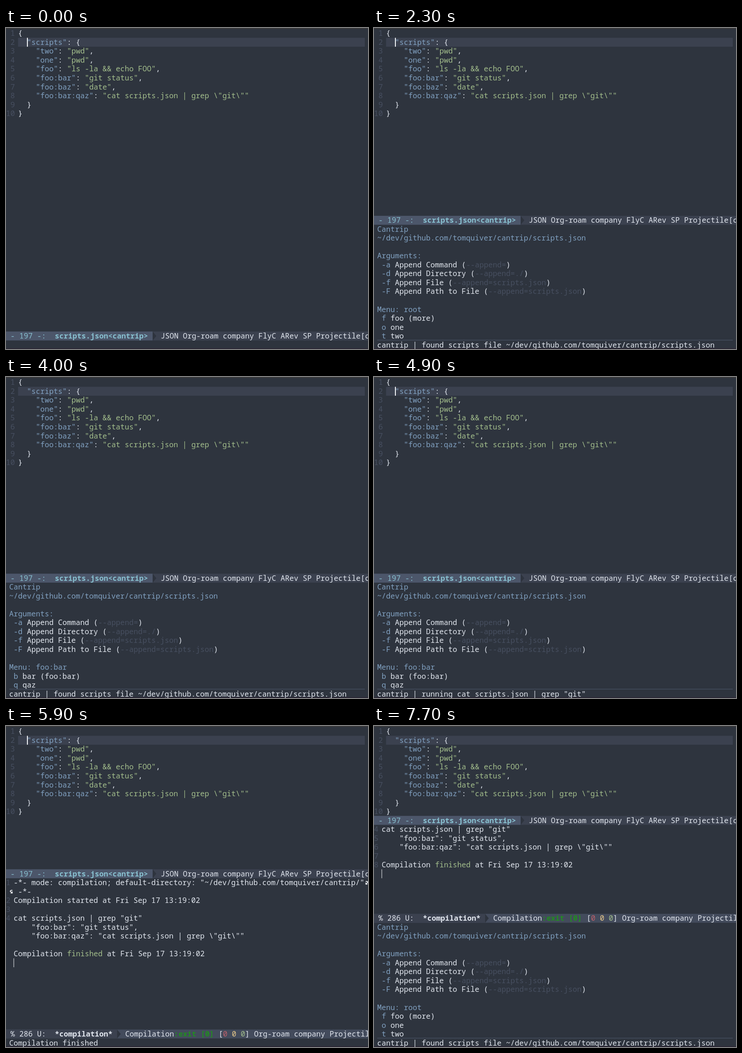
An HTML page with a canvas for the animation above (8 s loop, 795x704 px).

```html
<!DOCTYPE html>
<html lang="en">
<head>
<meta charset="utf-8">
<title>Script menu</title>
<style>
  html, body { margin: 0; width: 100%; height: 100%; overflow: hidden; background: #2e343e; }
  canvas { display: block; }
</style>
</head>
<body>
<canvas id="stage" width="795" height="704"></canvas>
<script>
const ctx = document.getElementById('stage').getContext('2d');
const WIDTH = 795, HEIGHT = 704, LOOP = 8000;
const ROW = 19.52, CELL = 9.76, TOP = 2, FRINGE = 7;
const FONT = '16.267px "Noto Sans Mono", monospace';
const C = {
  bg: '#2e343e', line: '#3b414f', panel: '#434b5c', active: '#4c566a', dim: '#474f60',
  text: '#e2e7ef', blue: '#81a1c1', cyan: '#88c0d0', green: '#a3be8c',
  exit: '#228b22', red: '#bf616a', yellow: '#ebcb8b', white: '#f4f6f9'
};

const SCRIPT = [
  '{',
  '  "scripts": {',
  '    "two": "pwd",',
  '    "one": "pwd",',
  '    "foo": "ls -la && echo FOO",',
  '    "foo:bar": "git status",',
  '    "foo:baz": "date",',
  '    "foo:bar:qaz": "cat scripts.json | grep \\"git\\""',
  '  }',
  '}'
];
const DIR = '~/dev/github.com/tomquiver/cantrip/';
const ARGUMENTS = [
  ['-a', 'Append Command', ''],
  ['-d', 'Append Directory', './'],
  ['-f', 'Append File', 'scripts.json'],
  ['-F', 'Append Path to File', 'scripts.json']
];
const MENUS = {
  root: ['f foo (more)', 'o one', 't two'],
  foo: ['f foo (foo)', 'b bar (more)', 'B baz'],
  'foo:bar': ['b bar (foo:bar)', 'q qaz']
};

const FOUND = `cantrip | found scripts file ${DIR}scripts.json`;
const dispatch = name => `cantrip | dispatcher for transient-args-key: cantrip-auto-${name}-transient`;

// Each track lists [start time, value].
const MESSAGES = [
  [0, ''], [1300, FOUND], [2700, dispatch('foo-foo')], [3000, FOUND],
  [3500, dispatch('foo-bar-bar')], [4000, FOUND],
  [4900, 'cantrip | running cat scripts.json | grep "git"'],
  [5000, 'Compilation finished'], [6900, ''], [7200, FOUND]
];
const VIEWS = [
  [0, { split: 34 }],
  [1500, { split: 21, menu: 'root' }],
  [3000, { split: 21, menu: 'foo' }],
  [4000, { split: 22, menu: 'foo:bar' }],
  [5000, { split: 16, output: 34 }],
  [7500, { split: 10, output: 21, menu: 'root', scrolled: true }]
];
const BLINKS = [300, 800, 1800, 2300, 3300, 4900, 5400, 5900, 6400, 6900, 7700];

const at = (track, t) => track.filter(([start]) => start <= t).pop()[1];
const rowY = row => TOP + row * ROW;

function rect(x, y, w, h, color) {
  ctx.fillStyle = color;
  ctx.fillRect(x, y, w, h);
}

function text(x, row, str, color = C.text, bold = false) {
  ctx.font = (bold ? 'bold ' : '') + FONT;
  ctx.fillStyle = color;
  ctx.fillText(str, x, rowY(row) + 15.4);
  return x + str.length * CELL;
}

function runs(x, row, ...parts) {
  for (const [str, color, bold] of parts) x = text(x, row, str, color, bold);
}

function drawScript(cursorOn) {
  const left = 2 * CELL + FRINGE;
  rect(left, rowY(1), WIDTH - FRINGE - left, ROW, C.line);
  SCRIPT.forEach((line, i) => {
    text(0, i, String(i + 1).padStart(2), C.dim);
    const parts = line.match(/"(?:\\.|[^"\\])*":?|[^"]+/g).flatMap(part => {
      if (part[0] !== '"') return [[part, C.text]];
      return part.endsWith(':') ? [[part.slice(0, -1), C.blue], [':', C.text]] : [[part, C.green]];
    });
    runs(left, i, ...parts);
  });
  if (cursorOn) rect(46, rowY(1), 2, ROW, C.white);
}

function modeline(row, split, leftColor, rightColor) {
  const y = rowY(row);
  rect(0, y, WIDTH, ROW, rightColor);
  rect(0, y, split, ROW, leftColor);
  ctx.fillStyle = C.bg;
  ctx.beginPath();
  ctx.moveTo(split, y);
  ctx.lineTo(split + 8, y + ROW / 2);
  ctx.lineTo(split, y + ROW);
  ctx.fill();
  return split + 8 + CELL;
}

function scriptModeline(row) {
  const x = modeline(row, 33 * CELL, C.active, C.line);
  runs(CELL, row, ['- 197 -:  ', C.cyan], ['scripts.json<cantrip>', C.cyan, true]);
  text(x, row, 'JSON Org-roam company FlyC ARev SP Projectile[c');
}

function outputModeline(row) {
  const x = modeline(row, 25 * CELL, C.line, C.panel);
  runs(CELL, row, ['% 286 U:  ', C.text], ['*compilation*', C.text, true]);
  runs(x, row, ['Compilation', C.text], [':exit [0]', C.exit, true], [' [', C.text],
    ['0 ', C.red], ['0 ', C.yellow], ['0', C.green], ['] Org-roam company Projectile', C.text]);
}

function wrapArrow(x, row, flip) {
  ctx.save();
  ctx.translate(x, rowY(row) + 6);
  if (flip) { ctx.translate(7, 0); ctx.scale(-1, 1); }
  ctx.strokeStyle = ctx.fillStyle = C.white;
  ctx.lineWidth = 1.8;
  ctx.beginPath();
  ctx.moveTo(5.6, 1);
  ctx.lineTo(3, 1);
  ctx.quadraticCurveTo(0.8, 1.4, 1, 3.6);
  ctx.quadraticCurveTo(2, 5, 4, 5);
  ctx.stroke();
  ctx.beginPath();
  ctx.moveTo(6, 3);
  ctx.lineTo(6, 8);
  ctx.lineTo(1, 8);
  ctx.fill();
  ctx.restore();
}

function drawOutput(row, scrolled) {
  const left = CELL + FRINGE;
  const stamp = 'at Fri Sep 17 13:19:02';
  const number = n => text(0, row, String(n), C.dim);
  if (!scrolled) {
    number(1);
    text(left, row, `-*- mode: compilation; default-directory: "${DIR}"`);
    wrapArrow(788.5, row++, true);
    wrapArrow(8.5, row, false);
    text(left, row++, ' -*-');
    number(2);
    text(left, row++, 'Compilation started ' + stamp);
    number(3);
    row++;
  }
  const lines = [
    'cat scripts.json | grep "git"',
    '    "foo:bar": "git status",',
    '    "foo:bar:qaz": "cat scripts.json | grep \\"git\\""',
    '',
    'Compilation '
  ];
  lines.forEach((line, i) => {
    if (scrolled || i === 0) number(4 + i);
    const end = text(left, row, line);
    if (i === 4) runs(end, row, ['finished', C.green], [' ' + stamp, C.text]);
    row++;
  });
  rect(16.6, rowY(row), 1, ROW, C.white);
}

function drawMenu(row, name) {
  text(FRINGE, row++, 'Cantrip', C.blue);
  text(FRINGE, row, DIR + 'scripts.json', C.blue);
  row += 2;
  text(FRINGE, row++, 'Arguments:', C.blue);
  for (const [key, label, value] of ARGUMENTS) {
    runs(FRINGE, row++, [` ${key} `, C.blue], [label + ' (', C.text],
      ['--append=' + value, C.dim], [')', C.text]);
  }
  row++;
  text(FRINGE, row++, 'Menu: ' + name, C.blue);
  for (const item of MENUS[name]) {
    runs(FRINGE, row++, [' ' + item[0], C.blue], [item.slice(1), C.text]);
  }
  rect(FRINGE, 684, WIDTH - 2 * FRINGE, 1, C.active);
}

function draw(t) {
  const view = at(VIEWS, t);
  rect(0, 0, WIDTH, HEIGHT, C.bg);
  rect(0, 0, WIDTH, 1.5, '#3d3c3b');
  rect(0, HEIGHT - 2, WIDTH, 2, '#2b2735');
  drawScript(BLINKS.filter(b => b <= t).length % 2 === 0);
  scriptModeline(view.split);
  if (view.output) {
    drawOutput(view.split + 1, view.scrolled);
    outputModeline(view.output);
  }
  if (view.menu) drawMenu((view.output || view.split) + 1, view.menu);
  text(FRINGE, 35, at(MESSAGES, t));
}

const start = performance.now();
function tick() {
  draw((performance.now() - start) % LOOP);
  requestAnimationFrame(tick);
}
tick();
</script>
</body>
</html>
```
